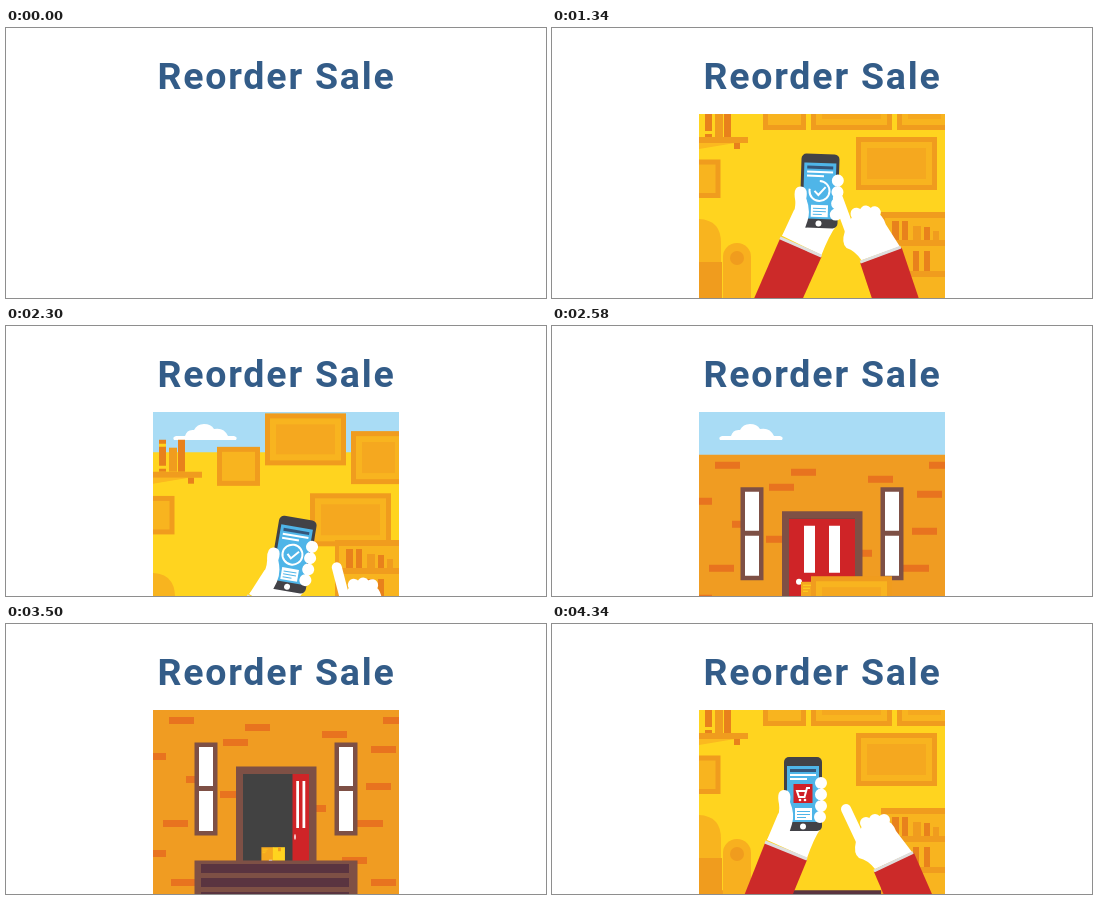
An HTML page that plays this animation: 540x270 px, repeating every 4.38 s.

```html
<!DOCTYPE html>
<html lang="en">
<head>
<meta charset="utf-8">
<title>Reorder Sale</title>
<style>
  html, body { margin: 0; width: 100%; height: 100%; overflow: hidden; background: #fff; }
  svg { display: block; width: 100%; height: 100%; }
  text { font: 700 37.5px Barlow, Roboto, Arial, sans-serif; letter-spacing: 1.8px; fill: #335c88; }
  .line { fill: none; stroke: #fff; stroke-width: 2; }
</style>
</head>
<body>
<svg viewBox="0 0 540 270">
  <defs>
    <clipPath id="view"><path d="M147 86H393V270H147z"/></clipPath>
    <clipPath id="doorway"><path d="M237 150h66v90h-66z"/></clipPath>
    <g id="window">
      <path fill="#7e5045" d="M188.500 118.500h23v93h-23z"/>
      <path fill="#fff" d="M193 123h14v39h-14zM193 167h14v40h-14z"/>
    </g>
  </defs>

  <text x="270.500" y="61.300" text-anchor="middle">Reorder Sale</text>

  <g id="scene" clip-path="url(#view)">
    <path fill="#a9dcf5" d="M147 86h246v184H147z"/>
    <path fill="#fff" d="M168 114q-2-3 2-4h9q2-7 9-6q3-6 10-6t10 5q10-2 14 7h6q4 1 2 4z"/>

    <g id="house">
      <path fill="#f09c22" d="M147 86h246v190H147z"/>
      <path stroke="#e8731f" stroke-width="7" d="M163 96.500h25M239 103.500h25M316 110.500h25M377 96.500h16M217 118.500h25M365 125.500h25M147 132.500h13M180 155.500h9M360 162.500h25M214 170.500h17M309 184.500h11M157 199.500h25M351 199.500h26M336 236.500h25M147 229.500h13M165 258.500h25M365 258.500h25"/>
      <use href="#window"/>
      <use href="#window" x="140"/>
      <path fill="#7e5045" d="M230 142.500h80.500v98h-80.500z"/>
      <path fill="#424242" d="M237 150h66v90h-66z"/>
      <g clip-path="url(#doorway)">
        <g id="door">
          <path fill="#cf2427" d="M237 150h66v120h-66z"/>
          <path fill="#fff" d="M252 157h11v47h-11zM277 157h11v47h-11z"/>
          <circle id="knob" cx="247" cy="213" r="3" fill="#fff"/>
        </g>
      </g>
      <g id="box">
        <path fill="#f5a81f" d="M249 213h21v24h-21z"/>
        <path fill="#ffd41f" d="M269 213h21v24h-21z"/>
        <path fill="#f09c1e" d="M278 213h5v7h-5z"/>
        <path stroke="#ffd41f" d="M251 216.500h9M251 219.500h7M251 222.500h5"/>
        <path fill="#fff" d="M262 235h6v2h-6z"/>
      </g>
      <g id="stairs">
        <path fill="#7e5045" d="M188.500 236.500h163v45h-163z"/>
        <path fill="#5a3440" d="M195 240h148v9H195zM195 254h148v9H195zM195 268h148v9H195z"/>
      </g>
    </g>

    <path id="wall" fill="#ffd41f" d="M147 86h246v184H147z"/>
    <g id="pictures"></g>
    <g id="leftShelf">
      <path fill="#fbb91f" d="M147 115h36l-36 6z"/>
      <path fill="#e8811c" d="M153 77h7v32h-7zM172 77h7v32h-7z"/>
      <path fill="#f09c1e" d="M163 85h8v24h-8z"/>
      <path fill="#ffd41f" d="M153 81h7v3h-7zM153 103h7v3h-7z"/>
      <path fill="#f09c1e" d="M147 109h49v6h-49z"/>
      <path fill="#e8811c" d="M182 115h6v6h-6z"/>
    </g>
    <g id="rightShelf">
      <path fill="#f8b41f" d="M329 184h64v90h-64z"/>
      <path fill="#f09c1e" d="M329 184h64v6h-64zM329 212h64v6h-64zM329 243h64v6h-64zM329 184h4v90h-4z"/>
      <path fill="#e8811c" d="M340 193h7v19h-7zM350 193h6v19h-6zM372 199h6v13h-6zM361 223h6v20h-6zM372 223h6v20h-6z"/>
      <path fill="#f09c1e" d="M361 198h8v14h-8zM381 203h6v9h-6z"/>
    </g>
    <g id="sofa">
      <path fill="#f8b41f" d="M147 191q22 1 22 24v60h-22z"/>
      <path fill="#f09c1e" d="M147 234h23v40h-23z"/>
      <path fill="#f8b01f" d="M171 274v-45a14 14 0 0 1 28 0v45z"/>
      <circle cx="185" cy="230" r="7" fill="#f09c1e"/>
    </g>

    <!-- Phone hand: the origin is the middle of the phone -->
    <g id="phone">
      <path fill="#cc2a29" d="M-38 49L4 66L-43 180L-90 180z"/>
      <path fill="#fff" d="M-36 46L-25 20L-12 8L17 20L18 34Q11 44 4 64z"/>
      <path stroke="#dedede" stroke-width="3" d="M-38 48L4 65"/>
      <rect x="-19" y="-37" width="38" height="74" rx="5" fill="#424247"/>
      <path fill="#4fb5e8" d="M-16-28h32v56h-32z"/>
      <path fill="#35557a" d="M-13-25h26v3h-26z"/>
      <path class="line" d="M-13-19h26M-13-15h17"/>
      <path fill="#fff" d="M-8 14h17v12h-17z"/>
      <path stroke="#4fb5e8" d="M-6 17.500h13M-6 20.500h13M-6 23.500h9"/>
      <circle cy="32.500" r="3" fill="#fff"/>
      <g id="cart">
        <path fill="#cf2027" d="M-9.500-10h19v19h-19z"/>
        <path class="line" d="M7-6H4L1.500 3H-4L-6-3H3"/>
        <circle cx="-3" cy="6" r="1.300" fill="#fff"/><circle cx="2" cy="6" r="1.300" fill="#fff"/>
      </g>
      <g class="line">
        <path id="ring" pathLength="1" d="M0-10a10 10 0 0 1 0 20a10 10 0 0 1 0-20"/>
        <path id="tick" pathLength="1" d="M-5 0L-1 4L6-4"/>
      </g>
      <path fill="#fff" d="M-36 46Q-22 24-24 10Q-27-4-19-4Q-11-4-13 8Q-8 20-11 30L-16 46z"/>
      <path stroke="#fff" stroke-width="12" stroke-linecap="round" d="M18-11h0M18 .500h0M18 12h0M17 23h0"/>
    </g>

    <!-- Pointing hand: the origin is the fingertip -->
    <g id="finger">
      <path fill="#cc2a29" d="M28 65L68 46L131 190H82z"/>
      <path fill="#fff" d="M10 34L18 14H40Q46 14 50 24L66 45L29 62Q22 53 13 51Q7 47 10 34z"/>
      <path stroke="#fff" stroke-width="10" stroke-linecap="round" d="M0 2L16 36"/>
      <path stroke="#fff" stroke-width="12" stroke-linecap="round" d="M20 16h0M29 13h0M38 13h0"/>
      <path stroke="#dedede" stroke-width="3" d="M28 64L67 45.500"/>
    </g>
  </g>
</svg>

<script>
const LOOP = 4380;
const el = Object.fromEntries([...document.querySelectorAll('svg [id]')].map(e => [e.id, e]));
const place = (e, x, y, r = 0) => e.setAttribute('transform', `translate(${x} ${y}) rotate(${r})`);
const ramp = (t, a, b) => Math.max(0, Math.min(1, (t - a) / (b - a)));

const linear = u => u;
const smooth = u => u * u * (3 - 2 * u);
const easeIn = u => u * u;
const easeOut = u => 1 - (1 - u) ** 2;

// Keys are [time, easing towards this key, ...values]
function track(t, keys) {
  const i = keys.findIndex(k => k[0] > t);
  if (i < 1) return keys.at(i).slice(2);
  const [a, b] = [keys[i - 1], keys[i]];
  const u = b[1](ramp(t, a[0], b[0]));
  return a.slice(2).map((v, n) => v + (b[n + 2] - v) * u);
}

const phoneKeys = [
  [100, linear, 251, 170, 0], [700, smooth, 259, 163, 1.5], [1340, smooth, 267.5, 163, 1.8],
  [2050, smooth, 274, 163, 4], [2500, easeIn, 314, 374, 22],
  [3740, linear, 215, 355, 0], [4340, easeOut, 251, 170, 0],
];
const fingerKeys = [
  [100, linear, 294, 183, 0], [620, smooth, 262, 165, 0], [780, linear, 262, 165, 0],
  [1340, smooth, 286, 168, 5], [2050, smooth, 296, 175, 6], [2500, easeIn, 409, 382, 21],
  [3740, linear, 341, 307, 0], [4340, easeOut, 294, 183, 0],
];
const doorKeys = [[3260, linear, 1], [3460, smooth, 0.25], [3620, linear, 0.25], [3940, smooth, 0.73]];

// x, y, width, height, time the fall begins
const pictures = [
  [211, 63, 43, 39, 2036], [259, 50, 81, 52, 2088], [345, 49, 55, 53, 2040],
  [304, 109, 81, 53, 2035], [130, 131.5, 38.5, 38.5, 2085],
].map(([x, y, w, h, start]) => {
  const g = document.createElementNS('http://www.w3.org/2000/svg', 'g');
  const rect = (inset, fill) =>
    `<rect x="${x + inset}" y="${y + inset}" width="${w - 2 * inset}" height="${h - 2 * inset}" fill="${fill}"/>`;
  g.innerHTML = rect(0, '#f09c1e') + rect(5, '#f8b41f') + (w > 50 ? rect(11, '#f5a81f') : '');
  el.pictures.append(g);
  return { g, start };
});

const fall = (t, start) => 280 * easeIn(ramp(t, start, start + 583));
const settle = t => 184 * (1 - ramp(t, 3735, 4250)) ** 2.5;
const drift = (t, start, side = -1) => t < 3000 ? fall(t, start) : side * settle(t);

function draw(t) {
  el.scene.style.display = t < 100 ? 'none' : '';

  const wallY = t < 3000 ? fall(t, 2080) : -184 * (1 - ramp(t, 3735, 4390)) ** 1.5;
  place(el.wall, 0, wallY);
  for (const p of pictures) place(p.g, 0, drift(t, p.start));
  place(el.leftShelf, 0, drift(t, 2090, -0.6));
  place(el.rightShelf, 0, drift(t, 2110, 1));
  place(el.sofa, 0, drift(t, 2040, 1));

  place(el.house, 0, 190 * (1 - ramp(t, 2440, 2800)) ** 3);
  const lift = smooth(ramp(t, 3600, 3940));
  const [open] = track(t, doorKeys);
  el.door.setAttribute('transform', `translate(${303 * (1 - open)} ${-24 * lift}) scale(${open} 1)`);
  el.knob.setAttribute('r', 3 + 0.8 * Math.sin(Math.PI * ramp(t, 2900, 3020)));
  place(el.stairs, 0, -6 * lift);
  const size = 1 - smooth(ramp(t, 3420, 3600));
  el.box.setAttribute('transform', `translate(${264 * (1 - size)} ${237 * (1 - size)}) scale(${size})`);

  place(el.phone, ...track(t, phoneKeys));
  place(el.finger, ...track(t, fingerKeys));

  const ordered = t < 3000;
  el.cart.setAttribute('transform', `scale(${ordered ? 1 - smooth(ramp(t, 820, 950)) : 1})`);
  for (const [e, a, b] of [[el.ring, 950, 1450], [el.tick, 1150, 1300]]) {
    const u = ordered ? ramp(t, a, b) : 0;
    e.style.display = u ? '' : 'none';
    e.setAttribute('stroke-dasharray', `${u} 2`);
  }
}

const begin = performance.now();
function tick() {
  draw((performance.now() - begin) % LOOP);
  requestAnimationFrame(tick);
}
tick();
</script>
</body>
</html>
```
